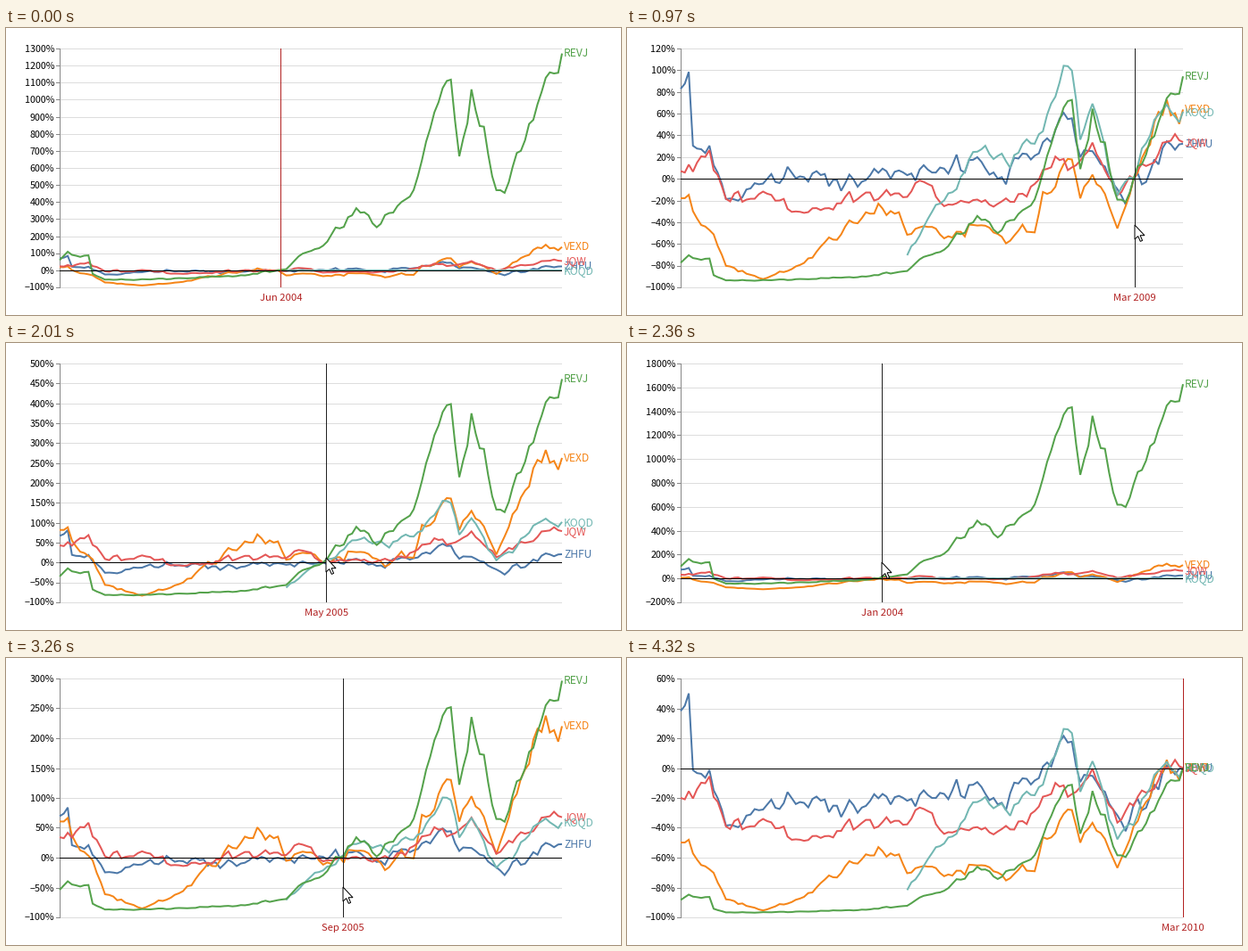
These frames come from a looping animation (688x322 px, 4.78 s). A matplotlib script:

```python
import numpy as np
import matplotlib.pyplot as plt
from matplotlib.animation import FuncAnimation

W, H = 688, 322
PX = 0.72                      # points per pixel at 100 dpi
LEFT, RIGHT, TOP, BOTTOM = 60, 622, 23, 291
LOOP, STEP = 4780, 20
RED, DARK = "#b22222", "#222222"
NAMES = "Jan Feb Mar Apr May Jun Jul Aug Sep Oct Nov Dec".split()

plt.rcParams["font.family"] = "Noto Sans CJK JP"

months = np.arange("2000-01", "2010-04", dtype="datetime64[M]")
days = (months.astype("datetime64[D]") - np.datetime64("2000-01-01")).astype(int)
xs = LEFT + (RIGHT - LEFT) * days / days[-1]

# months since January 2000 where the prices below are pinned
KEYS = [0, 2, 3, 7, 8, 11, 20, 29, 45, 53, 55, 59, 64, 72, 77, 86, 88, 93,
        95, 97, 100, 106, 108, 118, 121, 122]

# pointer path by step, and the times at which every eighth step begins
PATH_K = [0, 4, 13, 23, 34, 35, 39, 48, 55]
PATH_X = [684, 621.5, 501.5, 358.5, 197.5, 198, 325, 559.5, 651]
PATH_Y = [296, 217, 228, 241, 253, 254, 257, 261, 319]
STARTS = [410, 970, 1530, 2080, 2630, 3190, 3760, 4320]
ARROW = np.array([(0, 0), (0, 16), (3.7, 12.6), (6.3, 18.4), (8.6, 17.4),
                  (6.1, 11.7), (11, 11.7)])

fig = plt.figure(figsize=(W / 100, H / 100), dpi=100, facecolor="white")
ax = fig.add_axes([0, 0, 1, 1])
ax.set_xlim(0, W)
ax.set_ylim(H, 0)
ax.axis("off")


def stroke(color, width, z, x=(), y=()):
    return ax.plot(x, y, color=color, lw=width * PX, zorder=z, snap=False,
                   solid_capstyle="butt", solid_joinstyle="miter")[0]


def label(x, size, color, ha, z):
    return ax.text(x, 0, "", fontsize=size * PX, color=color, ha=ha,
                   va="baseline", zorder=z)


def prices(pins, wobble, seed):
    """Monthly prices through the pins, with a random wobble between them."""
    keys = np.array(KEYS[-len(pins):])
    m = np.arange(keys[0], len(months))
    noise = np.random.default_rng(seed).normal(0, wobble, len(m))
    noise = np.convolve(noise.clip(-2 * wobble, 2 * wobble), [0.6, 0.4], "same")
    reach = np.abs(m[:, None] - keys).min(axis=1).clip(0, 2) / 2
    return np.interp(m, keys, pins) * (1 + noise * reach)


class Series:
    def __init__(self, name, color, z, wobble, pins):
        self.price = prices(pins, wobble, z)
        self.first = len(months) - len(self.price)
        self.line = stroke(color, 2, z)
        self.text = label(624, 12, color, "left", z + 0.5)
        self.text.set_text(name)

    def change(self, base):
        if base < self.first:
            return self.price * 0
        return self.price / self.price[base - self.first] - 1

    def place(self, values, to_y):
        ys = to_y(values)
        self.line.set_data(xs[self.first:], ys)
        self.text.set_y(ys[-1] + 3.8)


series = [
    Series("ZHFU", "#4c78a8", 3, 0.08,
           [39.8, 43.2, 28.4, 28.4, 24.5, 17.7, 20.8, 22.25, 21.5, 23.44, 22.5,
            24.5, 23.82, 26.1, 21.8, 26.4, 29.1, 35, 33.9, 26.1, 27.3, 19.7,
            16.63, 29.3, 28.67, 28.8]),
    Series("VEXD", "#f58518", 4, 0.1,
           [64.6, 67, 55.2, 41.5, 38.4, 15.6, 6, 16.25, 54.4, 54.4, 38.1, 44.3,
            35.51, 44.8, 38.7, 39.8, 69.1, 89.2, 92.64, 64.5, 81.6, 42.7, 58.82,
            135.9, 118.4, 128.82]),
    Series("JQW", "#e45756", 5, 0.07,
           [100.5, 106.1, 100, 118.6, 101.2, 76.5, 82.8, 65.31, 82, 81.2, 78.2,
            91.2, 70.18, 75.9, 72.2, 89.4, 101.5, 111, 103.7, 109.6, 125.1, 79.7,
            89.46, 125.8, 127.16, 125.55]),
    Series("KOQD", "#72b7b2", 6, 0.07,
           [102.4, 192.8, 277.27, 432.7, 419.3, 458.2, 497.9, 707, 691.48, 471.2,
            585.8, 293, 338.53, 583, 526.8, 560.19]),
    Series("REVJ", "#54a24b", 7, 0.07,
           [25.9, 34, 31, 30.5, 12.9, 7.4, 7.8, 8.86, 11.4, 16.27, 17.3, 32.2,
            39.76, 75.5, 57.3, 92.9, 121.2, 190, 198.08, 125, 188.8, 92.7, 90.13,
            199.9, 204.62, 223.02]),
]

grid = stroke("#dddddd", 1, 1)
ticks = stroke("#888888", 1, 2)
stroke("#888888", 1, 2, [LEFT + 0.5] * 2, [TOP, BOTTOM + 1])
zero = stroke("black", 1, 9)
rule = stroke(DARK, 1, 10)
date = label(0, 11.3, RED, "center", 11)
tick_labels = [label(54, 10.7, "black", "right", 2) for _ in range(24)]
arrow = ax.fill(*ARROW.T, facecolor="white", edgecolor="black", lw=PX, zorder=12)[0]


def tick_step(span):
    raw = span / 10
    power = 10.0 ** np.floor(np.log10(raw))
    err = raw / power
    return power * (10 if err >= 50 ** .5 else 5 if err >= 10 ** .5
                    else 2 if err >= 2 ** .5 else 1)


def rungs(x0, x1, ys):
    """Separate horizontal segments as one broken line."""
    gap = np.full(len(ys), np.nan)
    x = np.tile([x0, x1, np.nan], len(ys))
    return x, np.column_stack([ys, ys, gap]).ravel()


def pointer(t):
    """Pointer tip and the x of the dated rule at time t."""
    if t < STARTS[0]:
        return None, 307.5
    k = int(np.interp(t, STARTS, np.arange(8) * 8) + 0.15)
    if k > PATH_K[-1]:
        return None, RIGHT
    x, y = np.interp(k, PATH_K, PATH_X), np.interp(k, PATH_K, PATH_Y)
    return (x, y), min(x, RIGHT)


def draw(i):
    tip, x = pointer(i * STEP + STEP / 2)
    day = (x - LEFT) / (RIGHT - LEFT) * days[-1]
    base = int(np.searchsorted(days, day + 1e-6, side="right")) - 1

    changes = [s.change(base) for s in series]
    low = min(c.min() for c in changes)
    high = max(c.max() for c in changes)
    step = tick_step(high - low)
    levels = np.arange(np.floor(low / step), np.ceil(high / step) + 1) * step

    def to_y(v):
        return BOTTOM - (v - levels[0]) / (levels[-1] - levels[0]) * (BOTTOM - TOP)

    for s, c in zip(series, changes):
        s.place(c, to_y)
    ys = np.round(to_y(levels)) + 0.5
    grid.set_data(*rungs(LEFT, RIGHT, ys))
    ticks.set_data(*rungs(LEFT - 4, LEFT, ys))
    for n, text in enumerate(tick_labels):
        text.set_visible(n < len(levels))
        if n < len(levels):
            text.set_text(f"{round(levels[n] * 100)}%".replace("-", "\u2212"))
            text.set_y(ys[n] + 3)
    y0 = np.round(to_y(0.0)) + 0.5
    zero.set_data([LEFT, RIGHT], [y0, y0])

    at = np.floor(x) + 0.5
    rule.set_data([at, at], [TOP, BOTTOM])
    rule.set_color(DARK if tip else RED)
    date.set_position((x, 306))
    date.set_text(f"{NAMES[base % 12]} {2000 + base // 12}")
    arrow.set_visible(tip is not None)
    if tip:
        arrow.set_xy(ARROW + np.floor(tip))
    return []


anim = FuncAnimation(fig, draw, frames=LOOP // STEP, interval=STEP,
                     init_func=lambda: [], repeat=True, repeat_delay=0, blit=False)
plt.show()
```
